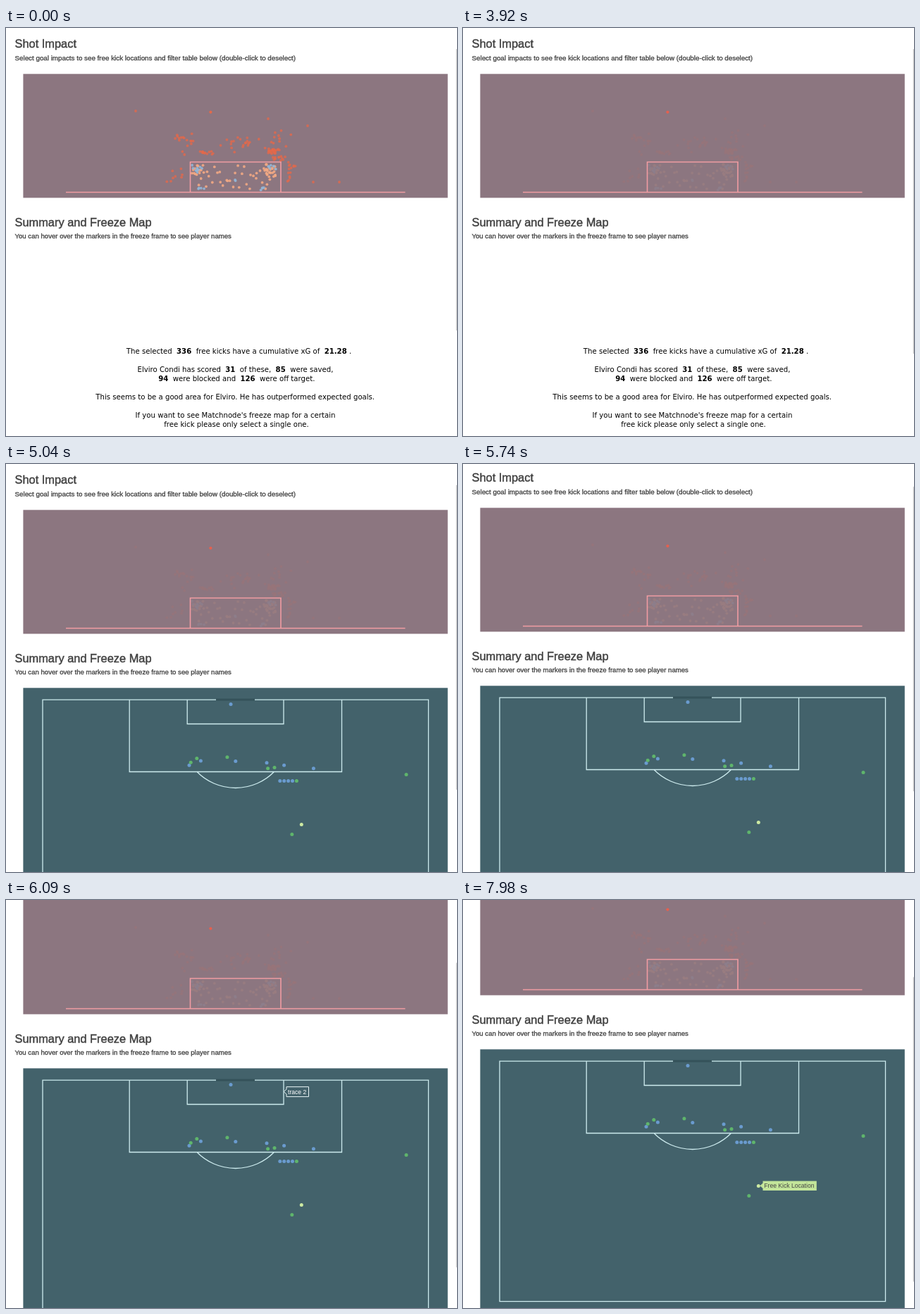
An HTML page that plays this animation: 640 by 580 pixels, repeating every 8 s.

```html
<!DOCTYPE html>
<html lang="en">
<head>
<meta charset="utf-8">
<title>Free kick dashboard</title>
<style>
  html, body { margin: 0; width: 100%; height: 100%; overflow: hidden; background: #fff; }
  svg { display: block; width: 640px; height: 580px; }
  text { white-space: pre; }
  .head, .sub { font-family: "Liberation Sans", Arial, sans-serif; fill: #404040; stroke: #404040; }
  .head { font-size: 16.4px; stroke-width: .45px; }
  .sub { font-size: 9.8px; stroke-width: .3px; }
  .sub.short { font-size: 9.6px; }
  .summary { font: 10.13px "DejaVu Sans", Verdana, sans-serif; text-anchor: middle; fill: #000; }
  .summary tspan { font-weight: bold; }
  .tip { font: 8.6px "Liberation Sans", Arial, sans-serif; }
  .frame { fill: none; stroke: #f09ca2; stroke-width: 1.6; }
  .lines { fill: none; stroke: #cdebee; stroke-width: 1.3; }
  .off { fill: #e2694b; fill-opacity: .8; }
  .saved { fill: #f2a983; fill-opacity: .9; }
  .scored { fill: #92b6d6; fill-opacity: .9; }
  .rival { fill: #6a9bcf; }
  .mate { fill: #5fb56c; }
</style>
</head>
<body>
<svg viewBox="0 0 640 580">
  <g id="page">
    <text class="head" x="12.5" y="28">Shot Impact</text>
    <text class="sub" x="12.5" y="46.3">Select goal impacts to see free kick locations and filter table below (double-click to deselect)</text>
    <rect x="24.4" y="65.3" width="602.4" height="176.1" fill="#8c7680"/>
    <g id="shots"></g>
    <path class="frame" d="M85 233.5H566.5M261.5 233.5V190.5H390V233.5"/>
    <circle id="picked" cx="290.4" cy="119.6" r="2.1"/>

    <text class="head" x="12.5" y="281.5">Summary and Freeze Map</text>
    <text class="sub short" x="12.5" y="299.3">You can hover over the markers in the freeze frame to see player names</text>

    <g id="summary" class="summary">
      <text x="330.5" y="463">The selected  <tspan>336</tspan>  free kicks have a cumulative xG of  <tspan>21.28</tspan> .</text>
      <text x="325.5" y="489">Elviro Condi has scored  <tspan>31</tspan>  of these,  <tspan>85</tspan>  were saved,</text>
      <text x="327.3" y="502"><tspan>94</tspan>  were blocked and  <tspan>126</tspan>  were off target.</text>
      <text x="325.2" y="528">This seems to be a good area for Elviro. He has outperformed expected goals.</text>
      <text x="325.5" y="554">If you want to see Matchnode's freeze map for a certain</text>
      <text x="327" y="567">free kick please only select a single one.</text>
    </g>

    <g id="pitch">
      <rect x="24.4" y="318.3" width="602.4" height="380" fill="#43626b"/>
      <path class="lines" d="M52 335.2H599.5V676.7H52ZM175.2 335.2V437.5H476.5V335.2M257.2 335.2V369.5H394V335.2M271 437.5A76.7 76.7 0 0 0 380.5 437.5"/>
      <path d="M298 335H353" stroke="#35525a" stroke-width="3"/>
      <g id="players"></g>
      <circle cx="419.3" cy="512.4" r="2.5" fill="#cdeaa2"/>
      <g id="lineTip" class="tip">
        <path d="M394.3 351.5L398 348V344.6H429.5V358.6H398V355Z" fill="#43626b" stroke="#e8f4f5"/>
        <text x="400" y="354.6" fill="#fff">trace 2</text>
      </g>
      <g id="kickTip" class="tip">
        <path d="M421.5 512.3L425.5 508.5V505.5H501.8V519H425.5V516Z" fill="#c3e59a"/>
        <text x="427.3" y="515.3" fill="#444">Free Kick Location</text>
      </g>
    </g>
  </g>
  <rect id="thumb" x="638.8" width="2" fill="#c6c6c6" rx=".6"/>
</svg>

<script>
const LOOP = 8000, STEP = 70, MAX_SCROLL = 106;
const GOAL = { left: 264, right: 387, top: 194, bottom: 231 };
const $ = id => document.getElementById(id);
const clamp = (v, lo = 0, hi = 1) => Math.min(hi, Math.max(lo, v));
const ramp = (t, from, to) => clamp((t - from) / (to - from));
const smooth = p => p * p * (3 - 2 * p);

let seed = 11;
const rnd = () => (seed = (seed * 16807) % 2147483647) / 2147483647;
const spread = () => (rnd() + rnd() + rnd()) / 1.5 - 1;

function dot(parent, kind, x, y, r) {
  const c = document.createElementNS("http://www.w3.org/2000/svg", "circle");
  c.setAttribute("class", kind);
  c.setAttribute("cx", x.toFixed(1));
  c.setAttribute("cy", y.toFixed(1));
  c.setAttribute("r", r);
  parent.append(c);
}
const shot = (kind, x, y) => dot($("shots"), kind, x, y, 1.9);

// Clouds of n markers around a centre; those on target stay inside the goal
function misses(n, cx, cy, w, h) {
  while (n--) shot("off", cx + spread() * w, cy + spread() * h);
}
function onTarget(kind, n, cx, cy, w, h) {
  while (n--) {
    const x = cx + spread() * w, y = cy + spread() * h;
    shot(kind, clamp(x, GOAL.left, GOAL.right), clamp(y, GOAL.top, GOAL.bottom));
  }
}

for (const [x, y] of [[184, 118], [372, 129], [428, 139], [436, 219], [473, 219]]) shot("off", x, y);
misses(16, 252, 160, 24, 24);
misses(22, 325, 164, 70, 32);
misses(12, 385, 161, 26, 20);
misses(24, 378, 175, 13, 5);
misses(12, 283, 177, 17, 4);
misses(12, 384, 185, 20, 8);
misses(8, 238, 207, 24, 18);
misses(14, 405, 203, 12, 28);

// Even scatter across the goal mouth, denser near the right post
for (let i = 0; i < 38; i++) {
  shot("saved", GOAL.left + 3.2 * i + spread() * 3, GOAL.top + rnd() * 35);
}
onTarget("saved", 24, 376, 204, 17, 15);
onTarget("saved", 10, 274, 205, 14, 16);
onTarget("scored", 10, 271, 200, 9, 10);
onTarget("scored", 6, 377, 198, 14, 7);
onTarget("scored", 4, 276, 228, 14, 4);
onTarget("scored", 4, 363, 228, 5, 7);
onTarget("scored", 2, 330, 215, 14, 8);

function players(kind, spots) {
  for (const [x, y] of spots) dot($("players"), kind, x, y, 2.5);
}
players("rival", [[319, 341.6], [260, 428.2], [276.4, 422], [325.8, 422.5], [370, 424.7], [394.6, 428.3], [436.4, 432.8]]);
players("mate", [[262.2, 424.2], [270.8, 418.6], [313.9, 416.8], [371.6, 432.8], [381, 431.6], [568, 441.6], [405.8, 526.6]]);
// The wall, with one team mate at its end
for (let i = 0; i < 5; i++) players(i < 4 ? "rival" : "mate", [[388.8 + 5.9 * i, 450.4]]);

const show = (id, on) => $(id).style.display = on ? "" : "none";

function draw(t) {
  const fade = ramp(t, 2660, 3430);
  $("shots").style.opacity = 1 - .88 * fade;
  $("picked").style.fill = fade > .5 ? "#e4604f" : "#e2694b";

  $("summary").style.opacity = 1 - .7 * ramp(t, 4410, 4690);
  const mapped = t >= 5040;
  show("summary", !mapped);
  show("pitch", mapped);
  show("lineTip", t >= 6020 && t < 6440);
  show("kickTip", t >= 7350);

  const scroll = Math.round(MAX_SCROLL * smooth(ramp(t, 5675, 6295)));
  $("page").setAttribute("transform", `translate(0 ${-scroll})`);
  $("thumb").setAttribute("y", 30 + scroll * .75);
  $("thumb").setAttribute("height", t < 3780 ? 400 : 433);
}

const start = performance.now();
function tick() {
  const t = (performance.now() - start) % LOOP;
  draw(Math.floor(t / STEP) * STEP);
  requestAnimationFrame(tick);
}
tick();
</script>
</body>
</html>
```
